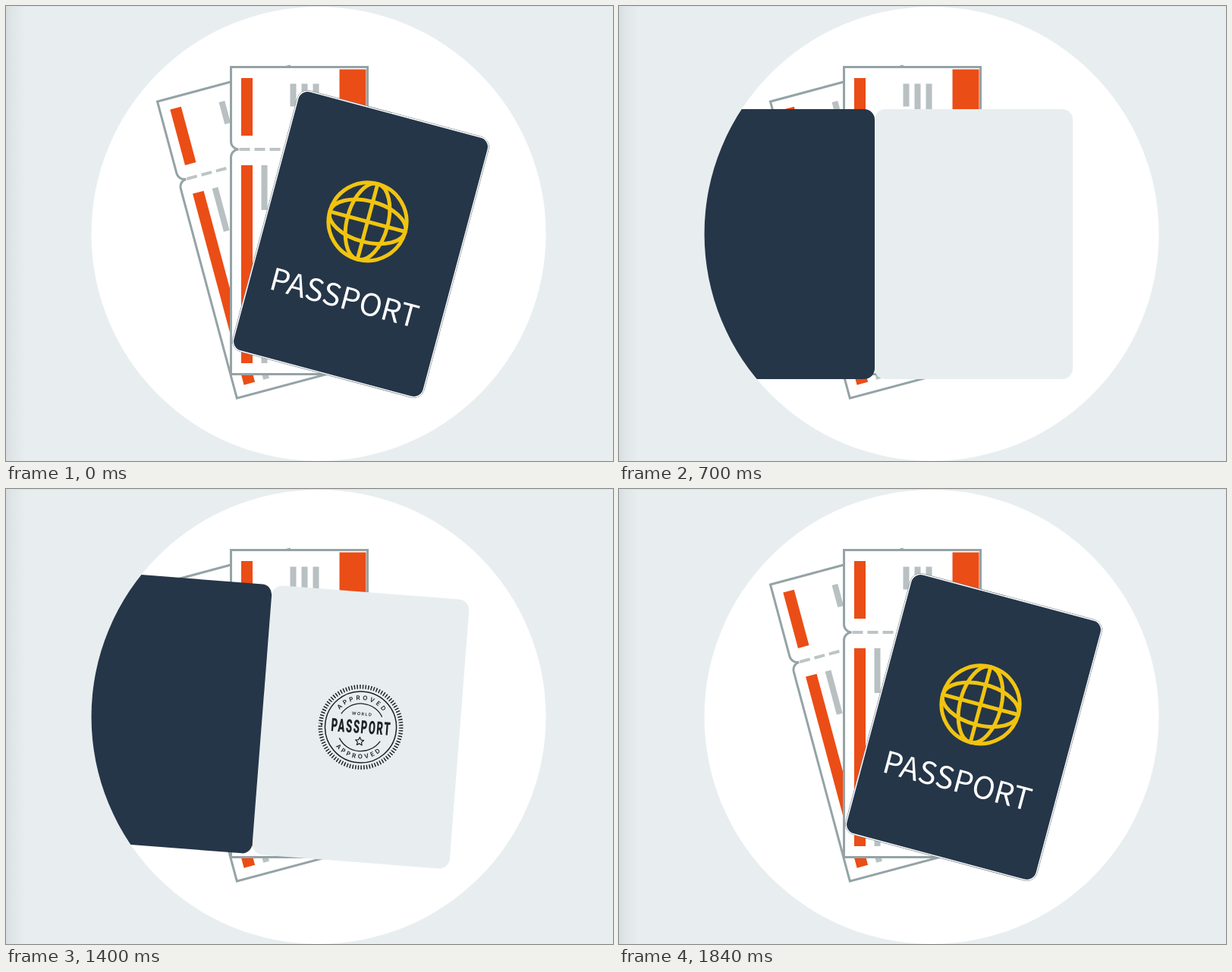
Write an HTML page that moves like this. It is 800x600 px and loops after 4340 ms.

```html
<!DOCTYPE html>
<html lang="en">
<head>
<meta charset="utf-8">
<title>Passport</title>
<style>
  html, body { margin: 0; width: 100%; height: 100%; overflow: hidden; background: #e8eef0; }
  svg { display: block; width: 100vw; height: 100vh; }
  text { text-anchor: middle; }
  .title { font: 40.5px "Noto Sans CJK JP", "Noto Sans CJK SC", "Open Sans", sans-serif; fill: #fff; }
  .arc { font: 600 8px Inter, Roboto, sans-serif; letter-spacing: 3.2px; }
  .small { font: 600 5.5px Inter, Roboto, sans-serif; letter-spacing: 1.4px; }
  .big { font: 900 24px Roboto, "Liberation Sans", sans-serif; letter-spacing: 3px; }
</style>
</head>
<body>
<svg viewBox="0 0 800 600">
  <defs>
    <linearGradient id="shade">
      <stop offset="0" stop-color="#d8dee0"/>
      <stop offset=".3" stop-color="#e0e6e8"/>
      <stop offset="1" stop-color="#e8eef0"/>
    </linearGradient>
    <clipPath id="disc"><circle cx="412" cy="300.5" r="299.5"/></clipPath>
    <path id="topArc" d="M-36 0A36 36 0 0 1 36 0"/>
    <path id="bottomArc" d="M-41.5 0A41.5 41.5 0 0 0 41.5 0"/>
    <g id="ticket">
      <path d="M0 0H180V405H0V119A10.500 10.500 0 0 1 10 108.500A10.500 10.500 0 0 1 0 98Z" fill="#fff" stroke="#95a3a6" stroke-width="3" stroke-linejoin="miter"/>
      <path d="M11 108.500H170" stroke="#bdc4c6" stroke-width="4" stroke-dasharray="14 6"/>
      <path d="M13.500 14.500h15v76h-15zM13.500 129.500h15v261h-15zM143 3h35v90h-35z" fill="#eb4d16"/>
      <path d="M78 22h8v30h-8zM93 22h8v50h-8zM108 22h8v50h-8zM40 129.500h8v59h-8zM40 350h8v40.500h-8z" fill="#b8c0c2"/>
    </g>
  </defs>

  <rect width="800" height="600" fill="#e8eef0"/>
  <rect width="26" height="600" fill="url(#shade)"/>
  <rect width="800" height="1" fill="#dde3e5"/>
  <circle cx="412" cy="300.5" r="299.5" fill="#fff"/>
  <use href="#ticket" transform="translate(199.500 126) rotate(-15)"/>
  <use href="#ticket" transform="translate(296.500 80.500)"/>

  <g clip-path="url(#disc)">
    <g id="passport">
      <rect id="page" x="-130.5" y="-178" width="261" height="356" rx="14" fill="#e8eef0" stroke-width=".8"/>
      <g id="stamp" fill="none" stroke="#1b2126">
        <circle r="53.2" stroke-width="5.500" pathLength="270" stroke-dasharray="1.2 1.8"/>
        <circle r="47" stroke-width="1.5"/>
        <path d="M-27 -15.500A31.200 31.200 0 0 1 27 -15.500M-27 16.500A31.600 31.600 0 0 0 27 16.500" stroke-width="1.300"/>
        <path id="star" stroke-width="1.2" stroke-linejoin="round"/>
        <g fill="#1b2126" stroke="none">
          <text class="arc"><textPath href="#topArc" startOffset="50%">APPROVED</textPath></text>
          <text class="arc"><textPath href="#bottomArc" startOffset="50%">APPROVED</textPath></text>
          <text class="small" x=".7" y="-15.5">WORLD</text>
          <text class="big" transform="translate(.8 8) scale(.545 1)">PASSPORT</text>
        </g>
      </g>
      <g id="cover">
        <rect x="-130.5" y="-178" width="261" height="356" rx="14" fill="#253648"/>
        <rect id="rim" x="-129.7" y="-177.2" width="259.4" height="354.4" rx="13.2" fill="none" stroke="#fff" stroke-width="1.5"/>
        <g id="front">
          <g transform="translate(1 -31)" fill="none" stroke="#f1c40f" stroke-width="5">
            <circle r="51.500"/>
            <ellipse rx="27" ry="51.500"/>
            <ellipse rx="51.500" ry="27"/>
            <path d="M0 -51V51M-51 0H51"/>
          </g>
          <text class="title" x="-2.5" y="88.5">PASSPORT</text>
        </g>
      </g>
    </g>
  </g>
</svg>
<script>
  const LOOP = 4340, MOTION_END = 1840, SPINE = -130.5;
  const $ = id => document.getElementById(id);

  // Each track lists [time, value]; values ease in and out between entries.
  const tilt = [[20, 15], [285, 17.3], [625, -2], [700, 0], [980, 0], [1190, -1.5], [1705, 15]];
  const fold = [[330, 0], [570, 180], [1302, 180], [1732, 0]];
  const stampScale = [[720, 2.4], [940, 1]];
  const stampAlpha = [[710, 0], [830, 1]];

  function at(track, t) {
    const next = track.findIndex(key => key[0] > t);
    if (next === 0) return track[0][1];
    if (next < 0) return track[track.length - 1][1];
    const [t0, v0] = track[next - 1], [t1, v1] = track[next];
    return v0 + (v1 - v0) * (1 - Math.cos(Math.PI * (t - t0) / (t1 - t0))) / 2;
  }

  const starPoints = Array.from({ length: 10 }, (_, i) => {
    const r = i % 2 ? 2.7 : 5.8, a = Math.PI * (i / 5 - .5);
    return [r * Math.cos(a), 19 + r * Math.sin(a)].map(n => n.toFixed(2));
  });
  $('star').setAttribute('d', 'M' + starPoints.join('L') + 'Z');

  function draw(t) {
    const resting = t < 20 || t >= MOTION_END;
    const width = Math.cos(at(fold, t) * Math.PI / 180);
    $('passport').setAttribute('transform', `translate(467.5 314) rotate(${at(tilt, t)})`);
    $('cover').setAttribute('transform', `translate(${SPINE} 0) scale(${width} 1) translate(${-SPINE} 0)`);
    $('front').setAttribute('visibility', width > -.5 ? 'visible' : 'hidden');
    $('rim').setAttribute('visibility', resting ? 'visible' : 'hidden');
    $('page').setAttribute('stroke', resting ? '#7d8991' : 'none');
    $('stamp').setAttribute('transform', `scale(${at(stampScale, t)})`);
    $('stamp').setAttribute('opacity', at(stampAlpha, t));
  }

  const start = performance.now();
  function tick() {
    draw((performance.now() - start) % LOOP);
    requestAnimationFrame(tick);
  }
  tick();
</script>
</body>
</html>
```
